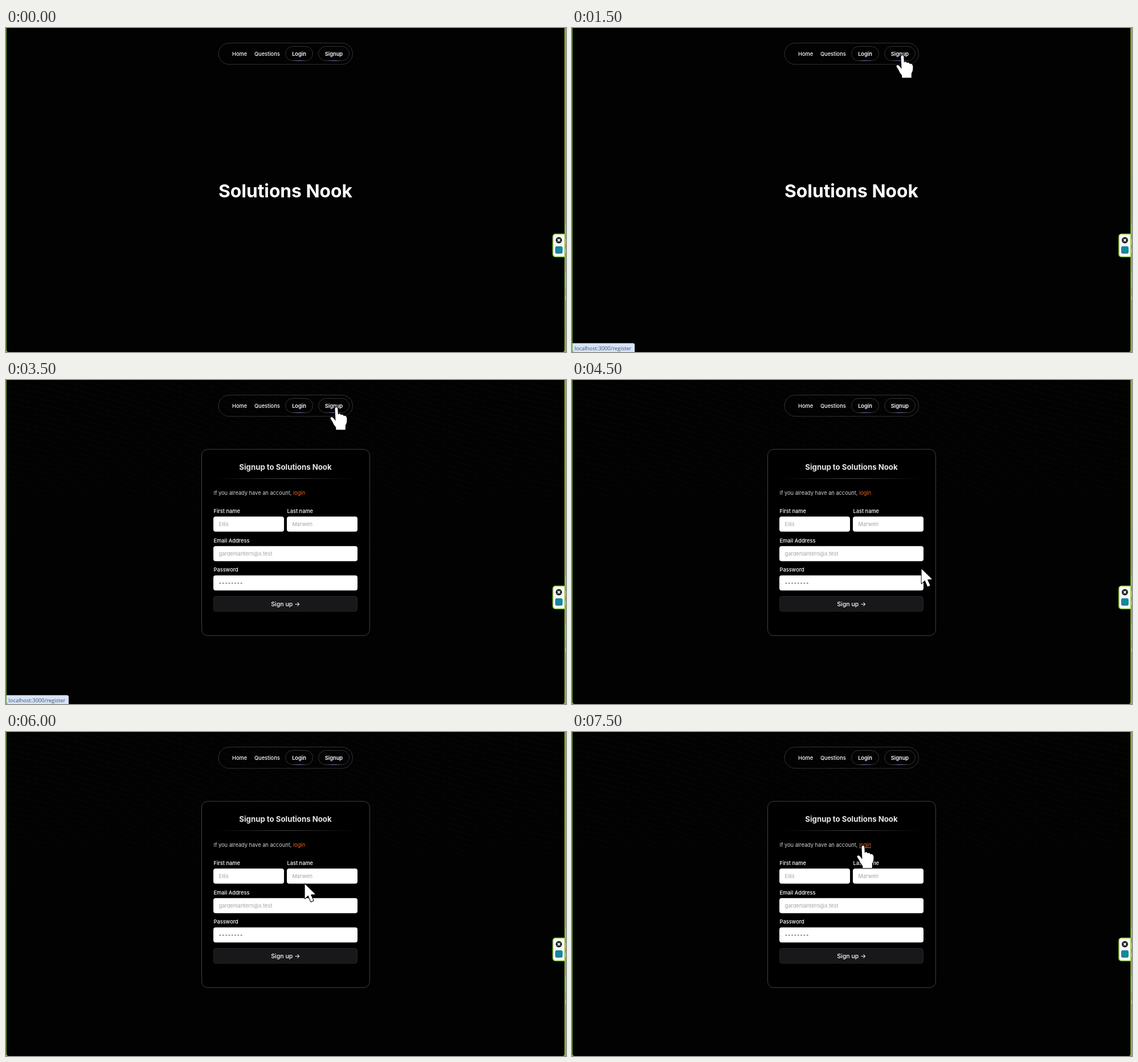
Animation of 983x570 px, one loop 8 s. Source, as an HTML page:

```html
<!DOCTYPE html>
<html lang="en">
<head>
<meta charset="utf-8">
<title>Signup walkthrough</title>
<style>
  html, body { margin: 0; width: 100%; height: 100%; overflow: hidden; background: #020203; }
  svg { display: block; width: 983px; height: 570px; }
  text { font: 400 9.26px Inter, sans-serif; font-optical-sizing: none; fill: #fff; }
  .mid { text-anchor: middle; }
  .medium { font-weight: 500; }
  .semi { font-weight: 600; }
  .hero { font-size: 31.75px; font-weight: 700; }
  .title { font-size: 13.23px; font-weight: 700; fill: #e8e8e8; }
  .note { fill: #d4d4d4; }
  .link { fill: #f2641c; }
  .hint { fill: #a3a3a8; }
  .submit { font-size: 10.58px; font-weight: 500; }
  .status { font: 9.4px "Open Sans", "Noto Sans", sans-serif; fill: #474d59; }
  .outline { fill: none; stroke: #333336; }
  .cursor { fill: #fff; stroke: #000; stroke-width: 2; paint-order: stroke; stroke-linejoin: round; }
</style>
</head>
<body>
<svg viewBox="0 0 983 570" xmlns="http://www.w3.org/2000/svg">
  <defs>
    <linearGradient id="glow">
      <stop offset="0" stop-color="#7482bd" stop-opacity="0"/>
      <stop offset=".5" stop-color="#7482bd"/>
      <stop offset="1" stop-color="#7482bd" stop-opacity="0"/>
    </linearGradient>
    <linearGradient id="rule">
      <stop offset="0" stop-color="#454548" stop-opacity="0"/>
      <stop offset=".5" stop-color="#454548"/>
      <stop offset="1" stop-color="#454548" stop-opacity="0"/>
    </linearGradient>
    <linearGradient id="cyan">
      <stop offset="0" stop-color="#06b6d4" stop-opacity="0"/>
      <stop offset=".5" stop-color="#06b6d4"/>
      <stop offset="1" stop-color="#06b6d4" stop-opacity="0"/>
    </linearGradient>
    <linearGradient id="edge" x2="0" y2="1">
      <stop offset="0" stop-color="#35b58c"/>
      <stop offset=".44" stop-color="#35b58c"/>
      <stop offset=".48" stop-color="#4fae3c"/>
      <stop offset="1" stop-color="#5fb53c"/>
    </linearGradient>
    <linearGradient id="fade" x2="0" y2="1">
      <stop offset="0" stop-color="#fff"/>
      <stop offset=".55" stop-color="#fff" stop-opacity=".8"/>
      <stop offset="1" stop-color="#fff" stop-opacity="0"/>
    </linearGradient>
    <mask id="fadeOut"><rect width="983" height="345" fill="url(#fade)"/></mask>
  </defs>

  <rect width="983" height="570" fill="#020203"/>
  <g id="waves" mask="url(#fadeOut)" fill="none" stroke="#fff" stroke-opacity=".04" stroke-dasharray="9 3"></g>

  <!-- navigation -->
  <rect class="outline" x="373" y="26.5" width="235.5" height="37.5" rx="18.75"/>
  <text class="medium" x="397" y="48.5">Home</text>
  <text class="medium" x="436" y="48.5">Questions</text>
  <rect class="outline" x="490.5" y="32.5" width="48" height="25" rx="12.5"/>
  <rect class="outline" x="548.5" y="32.5" width="54" height="25" rx="12.5"/>
  <rect x="502" y="57" width="25" height="1" fill="url(#glow)"/>
  <rect x="562" y="57" width="27" height="1" fill="url(#glow)"/>
  <text class="semi mid" x="514.5" y="48.5">Login</text>
  <text class="semi mid" x="575.5" y="48.5">Signup</text>

  <text id="hero" class="hero mid" x="490.5" y="297.5">Solutions Nook</text>

  <g id="card">
    <rect x="343.5" y="122" width="294.8" height="327.7" rx="10.5" fill="#000" stroke="#414143"/>
    <text class="title mid" x="490.5" y="157.5">Signup to Solutions Nook</text>
    <rect x="365" y="173" width="252" height="1" fill="url(#rule)"/>
    <text class="note" x="364.5" y="201.5">If you already have an account,</text>
    <text class="link" x="504" y="201.5">login</text>
    <rect id="underline" x="504" y="203" width="21" height="1" fill="#f2641c"/>
    <g id="fields"></g>
    <g id="dots" fill="#a3a3a8"></g>
    <rect x="364.5" y="380.5" width="252" height="26.5" rx="4" fill="#18181b" stroke="#242427"/>
    <text class="submit mid" x="490.8" y="397.5">Sign up →</text>
    <rect id="hover" x="365" y="406.7" width="252" height="1" fill="url(#cyan)"/>
  </g>

  <g id="status">
    <path d="M0 554.5H107Q110 554.5 110 557.5V570H0Z" fill="#d6e4fb"/>
    <text class="status" x="4.5" y="566.5">localhost:3000/register</text>
  </g>

  <!-- window edges -->
  <path d="M.5 0V565Q.5 569 3 570" fill="none" stroke="#689c35"/>
  <path d="M0 566V570H3Q.5 569 0 566ZM981 566V570H978Q980.5 569 981 566Z" fill="#94c33d"/>
  <rect x="982" width="1" height="570" fill="url(#edge)"/>
  <path d="M982.5 344V362M982.5 428V459" stroke="#d9a53a"/>
  <path d="M982.5 371V381M982.5 388V396M982.5 472V479" stroke="#8ccbd3"/>
  <rect x="980.4" width="1.6" height="570" fill="#94c33d"/>

  <!-- side widget -->
  <path d="M981 362.5H965Q960 362.5 960 367.5V397.5Q960 402.5 965 402.5H981Z" fill="#f8f9f6" stroke="#91c53f" stroke-width="1.6"/>
  <circle cx="970.5" cy="373.3" r="5.5" fill="#1d1d1d"/>
  <path d="M968.3 371.1L972.7 375.5M972.7 371.1L968.3 375.5" stroke="#fff" stroke-width="1.6"/>
  <rect x="964" y="384" width="13" height="13" rx="3" fill="#16879f"/>

  <path id="arrow" class="cursor" d="M.6 0V25.5L6.4 20L11.2 31L15.6 29L10.9 18.5L19 18Z"/>
  <path id="hand" class="cursor" d="M8 3Q8 0 10.3 0Q12.6 0 12.8 3L13.4 13Q14 11 16 11.2Q18 11.4 18.4 14Q19 12.4 21 12.8Q23 13.2 23.4 15.6Q24.2 14.4 26 15Q28.6 16 28.9 20Q29.4 27 26.3 32V39.5H9.8V35.5Q5 30 3.4 25L.4 20.5Q-.6 18 1.5 17.3Q4 16.8 6 20L9 24Z"/>
</svg>
<script>
const LOOP = 8000;
const $ = id => document.getElementById(id);

function add(parent, tag, attrs, text) {
  const el = document.createElementNS("http://www.w3.org/2000/svg", tag);
  for (const key in attrs) el.setAttribute(key, attrs[key]);
  if (text) el.textContent = text;
  parent.appendChild(el);
}

// faint slanted background lines
for (let y = -330; y < 340; y += 10) {
  add($("waves"), "path", { d: `M0 ${y}Q250 ${y + 50} 490 ${y + 150}T983 ${y + 300}` });
}

// label, placeholder, left, top, width
[
  ["First name", "Ellis", 364, 240.3, 124],
  ["Last name", "Marwen", 493, 240.3, 124],
  ["Email Address", "gardenlantern@x.test", 364, 292.3, 253],
  ["Password", "", 364, 343.7, 253]
].forEach(([label, hint, x, y, width]) => {
  add($("fields"), "text", { class: "medium", x: x + 0.5, y: y - 6.8 }, label);
  add($("fields"), "rect", { x, y, width, height: 26.5, rx: 4, fill: "#fff" });
  add($("fields"), "text", { class: "hint", x: x + 9.5, y: y + 16.7 }, hint);
});
for (let i = 0; i < 8; i++) add($("dots"), "circle", { cx: 376 + 5.3 * i, cy: 357.5, r: 1.6 });

// time, cursor, left, top
const moves = [
  [0, "", 0, 0],
  [500, "arrow", 615, 137],
  [1000, "arrow", 608, 58],
  [1500, "hand", 569.5, 48],
  [4000, "arrow", 696, 307],
  [4500, "arrow", 613, 332.5],
  [5000, "hand", 524, 385],
  [5500, "arrow", 531, 334],
  [6000, "arrow", 524, 267.5],
  [6500, "arrow", 521, 64],
  [7000, "arrow", 520, 84],
  [7500, "hand", 500.5, 200]
];

// element, start, end, opacity
const spans = [
  ["hero", 0, 3500, 1],
  ["waves", 3500, LOOP, 1],
  ["card", 3500, LOOP, 1],
  ["status", 1500, 4500, 1],
  ["hover", 5000, 5500, 0.5],
  ["hover", 5500, 6000, 0.9],
  ["underline", 7500, LOOP, 1]
];

function draw(t) {
  const shown = {};
  for (const [id, from, to, alpha] of spans) {
    shown[id] = t >= from && t < to ? alpha : shown[id] || 0;
  }
  for (const id in shown) $(id).style.opacity = shown[id];

  const [, kind, x, y] = moves.filter(m => m[0] <= t).pop();
  for (const id of ["arrow", "hand"]) {
    $(id).style.display = id === kind ? "inline" : "none";
    $(id).setAttribute("transform", `translate(${x} ${y})`);
  }
}

const start = performance.now();
function tick() {
  draw((performance.now() - start) % LOOP);
  requestAnimationFrame(tick);
}
draw(0);
requestAnimationFrame(tick);
</script>
</body>
</html>
```
